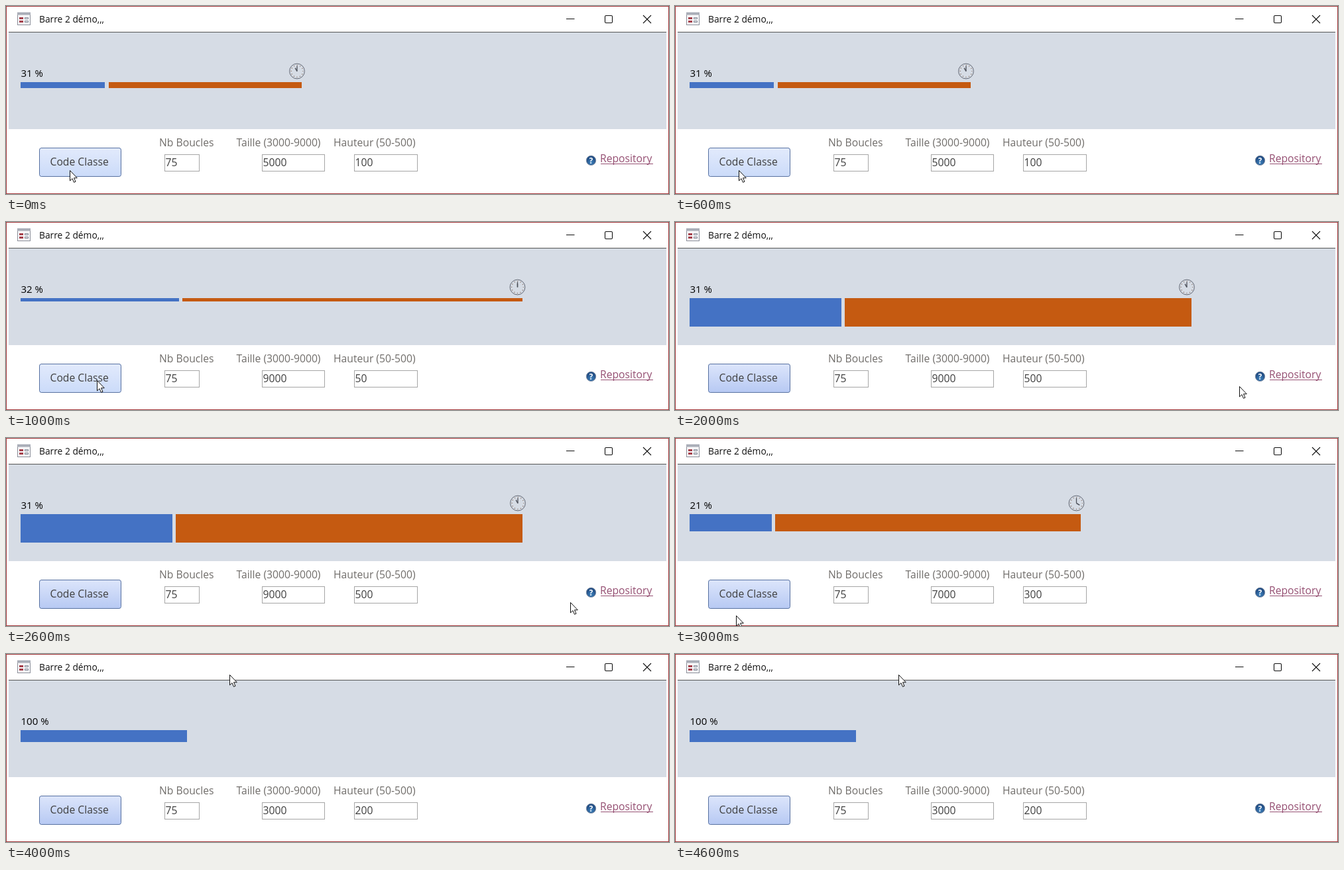
These frames come from a looping animation (1000 px wide and 284 px high, 5000 ms). An HTML page:

```html
<!DOCTYPE html>
<html lang="fr">
<head>
<meta charset="utf-8">
<title>Barre 2 démo</title>
<style>
  html, body { margin: 0; width: 100%; height: 100%; overflow: hidden; background: #fff; }
  svg { display: block; }
  text { font: 15.7px "Open Sans", "Noto Sans", sans-serif; fill: #3f3f3f; white-space: pre; }
  .title { font-size: 13.8px; fill: #111; }
  .percent { font-size: 15px; fill: #000; }
  .label { fill: #706d6a; }
  .link { fill: #954f72; }
  .box { fill: #fff; stroke: #a6a6a6; }
  .line { fill: none; stroke: #111; stroke-width: 1.1; }
</style>
</head>
<body>
<svg width="1000" height="284" viewBox="0 0 1000 284">
  <defs>
    <linearGradient id="light" x2="0" y2="1">
      <stop stop-color="#e2eafc"/><stop offset="1" stop-color="#cbdbf9"/>
    </linearGradient>
    <linearGradient id="dark" x2="0" y2="1">
      <stop stop-color="#dce5fb"/><stop offset="1" stop-color="#b7c9f3"/>
    </linearGradient>
    <radialGradient id="ball" cy=".7">
      <stop stop-color="#4187c2"/><stop offset="1" stop-color="#234f86"/>
    </radialGradient>
  </defs>

  <rect x=".5" y=".5" width="999" height="283" fill="#fff" stroke="#a4373a"/>
  <rect x="4" y="40" width="992" height="146" fill="#d6dce5"/>
  <path d="M4 39.5H996" stroke="#555"/>

  <!-- title bar -->
  <g>
    <rect x="17.5" y="10.5" width="19" height="18" fill="#f7f7f9" stroke="#8b8f99"/>
    <path d="M17 10.5H37M17 12.5H37" stroke="#a9adb7" stroke-width="2"/>
    <path d="M20 17h6v3h-6zM20 22h6v3h-6z" fill="#a5404b"/>
    <path d="M28.5 17.5h5v2h-5zM28.5 22.5h5v2h-5z" fill="#fff" stroke="#7d8492"/>
  </g>
  <text class="title" x="50" y="25">Barre 2 démo,,,</text>
  <path class="line" d="M845 19.5H857.5M961 14L973 26M973 14L961 26"/>
  <rect class="line" x="903.5" y="14.5" width="11" height="11" rx="1.5"/>

  <!-- progress -->
  <text class="percent" id="percent" x="22.5" y="107"></text>
  <rect id="done" x="22" y="115" fill="#4472c4"/>
  <rect id="left" y="115" fill="#c55a11"/>
  <g id="clock" fill="none" stroke="#4d515a">
    <circle r="11.4" stroke="#626773"/>
    <circle r="9" stroke="#8a7468" stroke-width="1.5" stroke-dasharray="1.1 3.612" stroke-dashoffset=".55"/>
    <path d="M0 0V-8" stroke-width="1.3"/>
    <path id="hour" d="M0 0V-5.6" stroke-width="1.5"/>
  </g>

  <!-- controls -->
  <rect id="button" x="50.5" y="214.5" width="123" height="43" rx="3" stroke="#8faadc"/>
  <rect x="50.5" y="214.5" width="123" height="43" rx="3" fill="none" stroke="#203864" stroke-dasharray="1 1"/>
  <text x="66.5" y="241">Code Classe</text>
  <text class="label" x="231" y="212">Nb Boucles</text>
  <text class="label" x="347.5" y="212">Taille (3000-9000)</text>
  <text class="label" x="494" y="212">Hauteur (50-500)</text>
  <rect class="box" x="239.5" y="224.5" width="52" height="25"/>
  <rect class="box" x="386.5" y="224.5" width="94" height="25"/>
  <rect class="box" x="525.5" y="224.5" width="95" height="25"/>
  <text x="240.5" y="242">75</text>
  <text id="size" x="387.5" y="242"></text>
  <text id="height" x="526.5" y="242"></text>
  <circle cx="882.5" cy="233.3" r="7.2" fill="url(#ball)" stroke="#8795a8"/>
  <text x="882.5" y="237.6" text-anchor="middle" style="font-size:11.5px;font-weight:700;fill:#fff">?</text>
  <text class="link" x="896" y="236">Repository</text>
  <path d="M897 238.5H976" stroke="#954f72"/>

  <path id="cursor" d="M.5 .5V16L4 12.7L6.5 18.4L9 17.3L6.5 11.8H11.3Z" fill="#fff" stroke="#111" stroke-linejoin="round"/>
</svg>
<script>
const STEP = 1000;
const ORANGE_GAP = 5;
const steps = [
  { percent: 31, size: 5000, height: 100, bar: 9, done: 127, gap: 6, end: 446, clock: 439, hour: 11, fill: 'light', cursor: [96, 248] },
  { percent: 32, size: 9000, height: 50, bar: 5, done: 239, end: 779, clock: 771.5, hour: 12, fill: 'light', cursor: [137, 239] },
  { percent: 31, size: 9000, height: 500, bar: 43, done: 229, end: 779, clock: 772, hour: 11, fill: 'dark', cursor: [851, 248] },
  { percent: 21, size: 7000, height: 300, bar: 26, done: 124, end: 612, clock: 605.5, hour: 4, fill: 'dark', cursor: [92, 268] },
  { percent: 100, size: 3000, height: 200, bar: 18, done: 251, end: 0, fill: 'dark', cursor: [337, 31] }
];

const el = id => document.getElementById(id);
const set = (id, attrs) => Object.entries(attrs).forEach(([k, v]) => el(id).setAttribute(k, v));

function show(s) {
  const start = 22 + s.done + (s.gap || ORANGE_GAP);
  el('percent').textContent = s.percent + ' %';
  el('size').textContent = s.size;
  el('height').textContent = s.height;
  set('done', { width: s.done, height: s.bar });
  set('left', { x: start, width: Math.max(0, s.end - start), height: s.bar });
  set('clock', { transform: `translate(${s.clock || 0} 98.5)`, visibility: s.clock ? 'visible' : 'hidden' });
  set('hour', { transform: `rotate(${(s.hour || 0) * 30})` });
  set('button', { fill: `url(#${s.fill})` });
  set('cursor', { transform: `translate(${s.cursor})` });
}

const origin = performance.now();
let current = -1;

function tick() {
  const index = Math.floor((performance.now() - origin) / STEP) % steps.length;
  if (index !== current) show(steps[current = index]);
  requestAnimationFrame(tick);
}
tick();
</script>
</body>
</html>
```
